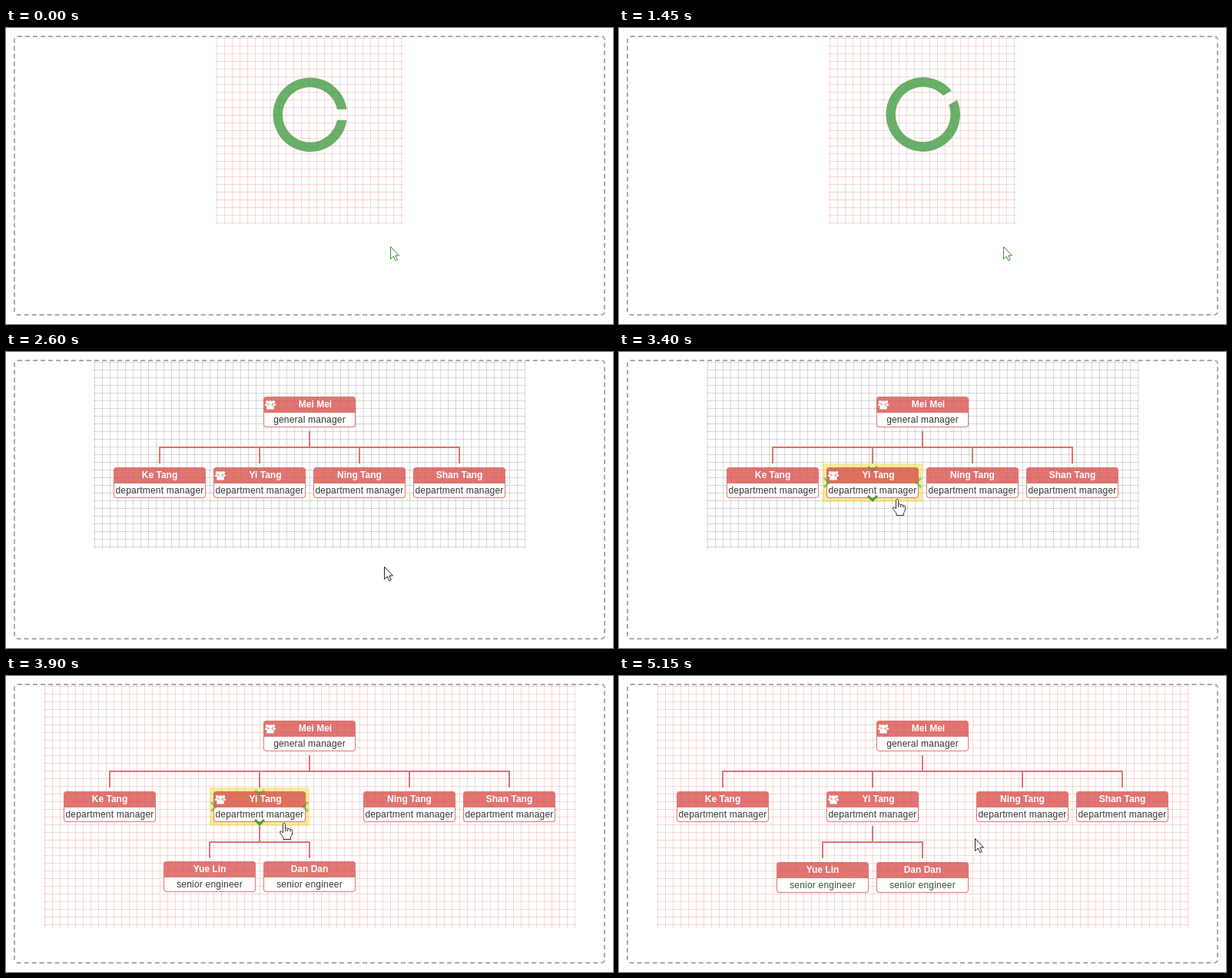
An HTML page for the animation above (6150 ms loop, 790x385 px).

```html
<!DOCTYPE html>
<html lang="en">
<head>
<meta charset="utf-8">
<title>Expanding organisation chart</title>
<style>
  html, body { margin: 0; width: 100%; height: 100%; overflow: hidden; background: #fff; }
  body { position: relative; font: 12px "Liberation Sans", Arial, sans-serif; cursor: default; }
  body > *, .node { position: absolute; box-sizing: border-box; }
  #frame { left: 10px; top: 10px; width: 770px; height: 364px; border: 2px dashed #aaa; border-radius: 5px; }
  #grid {
    top: 12px; border: 1px solid transparent;
    background: linear-gradient(90deg, var(--line) 10%, transparent 0) 0 0 / 10px 10px,
                linear-gradient(var(--line) 10%, transparent 0) 0 0 / 10px 10px;
  }
  #hover { left: 265px; top: 145px; width: 130px; height: 50px; background: rgba(238, 217, 54, .5); }
  svg.layer { left: 0; top: 0; width: 790px; height: 385px; }
  #chart, #team { left: 0; top: 0; }
  .node { width: 120px; text-align: center; white-space: nowrap; }
  .name {
    height: 20px; line-height: 20px; font-weight: bold; color: #fff;
    background: rgba(217, 83, 79, .8); border-radius: 4px 4px 0 0;
  }
  .role {
    box-sizing: border-box; height: 20px; line-height: 18px; letter-spacing: .2px; color: #333;
    background: #fff; border: 1px solid rgba(217, 83, 79, .8); border-radius: 0 0 4px 4px;
  }
  #team .role { color: inherit; }
  .lead .name { padding-left: 15px; }
  .node svg { position: absolute; left: 2px; top: 4px; fill: #fff; }
</style>
</head>
<body>
<div id="frame"></div>
<div id="grid"></div>
<svg class="layer"><path id="lines" fill="none" stroke="rgba(217,83,79,.8)" stroke-width="2"/></svg>
<div id="hover"></div>
<div id="chart"></div>
<div id="team"></div>
<svg class="layer">
  <g id="ring"><path fill="rgba(68,157,68,.8)"/></g>
  <g id="chevrons" fill="none" stroke="rgba(68,157,68,.5)" stroke-width="3"></g>
  <path id="arrow" fill="#fff" d="M.5 .5V16.5L4.3 13L6.8 18.6L9.2 17.5L6.8 12H11.5Z"/>
  <path id="hand" fill="#fff" stroke="#333" stroke-linejoin="round"
    d="M-1.5 1.5Q0 -.8 1.5 1.5V7Q3.5 5.8 4.7 7.7Q6.7 6.6 7.8 8.5Q10.3 7.8 10.5 10.5V15L8.5 18.5V21.5H-1V19L-5.2 13Q-6 10.5 -3.8 10.7L-1.5 13ZM1.5 7V11M4.7 7.7V11M7.8 8.5V11.5"/>
</svg>
<script>
const $ = id => document.getElementById(id);
const LOOP = 6150, STEP = 50, LOADED = 2000, OPEN = 3650;

const icon = `<svg width="14" height="13"><circle cx="2.8" cy="3" r="2"/><circle cx="11.2" cy="3" r="2"/>
  <circle cx="7" cy="4" r="2.8"/><path d="M0 8V6Q1 4.6 3.5 5.5L4.5 8ZM14 8V6Q13 4.6 10.5 5.5L9.5 8Z
  M2.4 12.5Q1.6 7 4.5 6.8H9.5Q12.4 7 11.6 12.5Z"/></svg>`;

function addNode(parent, x, y, name, role, lead) {
  const node = document.createElement("div");
  node.className = lead ? "node lead" : "node";
  node.style.cssText = `left:${x}px;top:${y}px`;
  node.innerHTML = `<div class="name">${name}</div><div class="role">${role}</div>${lead ? icon : ""}`;
  $(parent).append(node);
  return node;
}

const closedX = [140, 270, 400, 530], openX = [75, 270, 465, 595];
addNode("chart", 335, 58, "Mei Mei", "general manager", true);
const managers = ["Ke Tang", "Yi Tang", "Ning Tang", "Shan Tang"].map((name, i) =>
  addNode("chart", closedX[i], 150, name, "department manager", i === 1));
addNode("team", 205, 242, "Yue Lin", "senior engineer");
addNode("team", 335, 242, "Dan Dan", "senior engineer");

// Open ring whose gap has parallel edges
const rim = r => Math.sqrt(r * r - 49);
$("ring").firstChild.setAttribute("d",
  `M${rim(48.3) + .8} 7A48.3 48.3 0 1 1 ${rim(48.3) + .8} -7H${rim(35.8) + .8}A35.8 35.8 0 1 0 ${rim(35.8) + .8} 7Z`);

// Chevrons: x, y, rotation from pointing down
$("chevrons").innerHTML = [[330, 151.5, 0], [270, 170, -90], [390, 170, 90], [330, 190, 0]].map(([x, y, a], i) =>
  `<path d="M-6 -3L0 3L6 -3" transform="translate(${x} ${y}) rotate(${a})" ${i === 3 ? 'stroke="#449d44"' : ""}/>`).join("");

const ramp = (t, from, to) => Math.min(1, Math.max(0, (t - from) / (to - from)));
const mix = (a, b, u) => Math.round(a + (b - a) * u);
const show = (id, on) => $(id).style.display = on ? "" : "none";

// Lines from a parent to a row of children
const branch = (x, y, xs, end) =>
  `M${x} ${y}V${y + 21}M${xs[0]} ${end}V${y + 21}H${xs.at(-1)}V${end}` +
  xs.slice(1, -1).map(c => `M${c} ${y + 21}V${end}`).join("");

function drawCursor(t) {
  const go = ramp(t, 2550, 2900), leave = 1 - (1 - ramp(t, 3900, 4300)) ** 3;
  const hand = t >= 2900 && t <= 3900;
  const x = leave ? mix(362, 463, leave) : mix(500, 362, go * go * (3 - 2 * go));
  const y = leave ? mix(191, 211, leave) : mix(284, 191, go * go * (3 - 2 * go));
  show("hand", hand);
  show("arrow", !hand);
  $(hand ? "hand" : "arrow").setAttribute("transform", `translate(${x} ${y})`);
  $("arrow").setAttribute("stroke", t < LOADED ? "#3a8f3a" : "#222");
}

function draw(t) {
  const loading = t < LOADED, open = t >= OPEN;
  const width = loading ? 244 : open ? 692 : 562;
  const grid = $("grid").style;
  grid.left = 395 - width / 2 + "px";
  grid.width = width + "px";
  grid.height = (open ? 316 : 244) + "px";
  grid.setProperty("--line", loading || open ? "rgba(200,0,0,.15)" : "rgba(0,0,0,.15)");

  show("ring", loading);
  $("ring").setAttribute("transform", `translate(395 112.8) rotate(${t / STEP * 11.33})`);

  const xs = open ? openX : closedX;
  managers.forEach((node, i) => node.style.left = xs[i] + "px");
  $("lines").setAttribute("d", branch(395, 103, xs.map(x => x + 60), 145) +
    (open ? branch(330, 195, [265, 395], 237) : ""));
  $("chart").style.opacity = $("lines").style.opacity = ramp(t, LOADED - STEP, LOADED + 150);

  const slide = 1 - (1 - ramp(t, OPEN, OPEN + 300)) ** 2;
  show("team", open);
  $("team").style.opacity = slide;
  $("team").style.transform = `translateY(${Math.round(-40 * (1 - slide))}px)`;
  $("team").style.color = t < 4250 ? "#333" : "#2b5c33";

  const fade = 1 - ramp(t, 4850, 5150);
  $("hover").style.opacity = ramp(t, 2900, 3200) * fade;
  $("chevrons").style.opacity = ramp(t, 3200, 3400) * fade;
  drawCursor(t);
}

const start = performance.now();
function tick() {
  const t = (performance.now() - start) % LOOP;
  draw(Math.floor(t / STEP) * STEP);
  requestAnimationFrame(tick);
}
tick();
</script>
</body>
</html>
```
